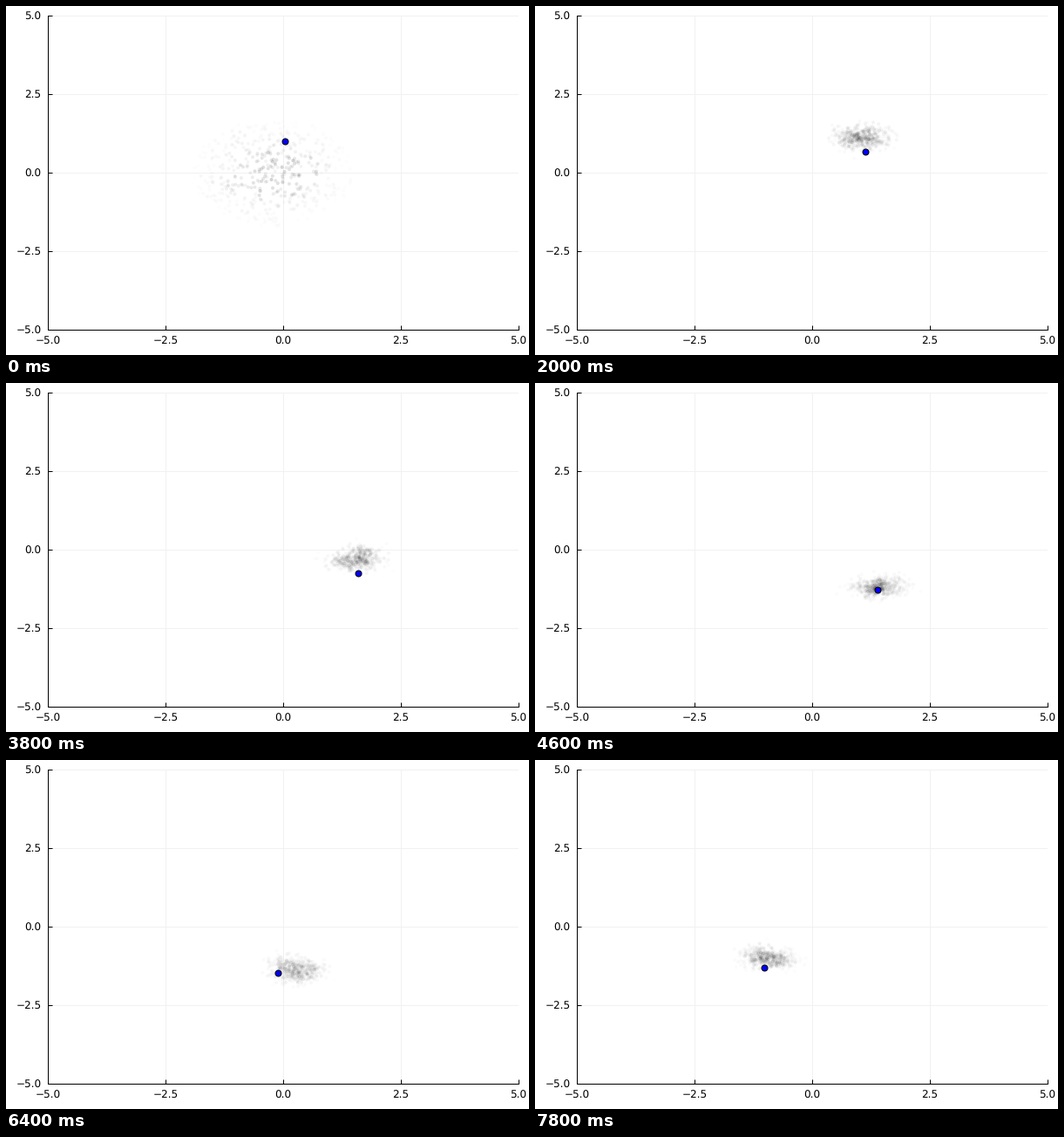
Write a matplotlib script that moves like this. It is 600 px wide and 400 px high and loops after 8000 ms.

```python
import numpy as np
import matplotlib.pyplot as plt
from matplotlib.animation import FuncAnimation

W, H = 600, 400
FRAMES, STEP = 40, 200
N, CLUMPS = 504, 12

# Key times (s), the moving point and the centre of the particle cloud
T = np.array([0, 1.2, 2.0, 3.2, 4.6, 6.4, 7.8])
TRACK = np.array([(0.04, 1.00), (0.70, 0.98), (1.13, 0.68), (1.56, -0.26),
                  (1.39, -1.28), (-0.12, -1.47), (-1.01, -1.30)])
CENTRE = np.array([(-0.20, 0.25), (0.45, 1.20), (1.05, 1.10), (1.50, 0.38),
                   (1.42, -1.20), (0.28, -1.38), (-0.93, -1.00)])

rng = np.random.default_rng(11)


def follow(points, t):
    """Cubic Hermite path through the key points."""
    slope = np.gradient(points, T, axis=0)
    i = min(np.searchsorted(T, t, side="right") - 1, len(T) - 2)
    h = T[i + 1] - T[i]
    u = (t - T[i]) / h
    ease = u * u * (3 - 2 * u)
    return ((1 - ease) * points[i] + ease * points[i + 1]
            + h * u * (1 - u) * ((1 - u) * slope[i] - u * slope[i + 1]))


def walk(count, keep):
    """Steady random walk with unit spread, one array per frame."""
    z = rng.standard_normal((count, 2))
    steps = []
    for _ in range(FRAMES):
        steps.append(z - z.mean(axis=0))
        z = keep * z + np.sqrt(1 - keep**2) * rng.standard_normal((count, 2))
    return steps


def prior():
    """Wide starting cloud, opacity falling away from its centre."""
    r = rng.random(N) ** 0.53
    a = rng.uniform(0, 2 * np.pi, N)
    xy = np.c_[-0.22 + 1.7 * r * np.cos(a), 1.72 * r * np.sin(a)]
    return xy, 0.15 * np.exp(-2.6 * r**2) * rng.uniform(0.3, 1, N)


START = prior()
DRIFT = walk(CLUMPS, 0.95)
JITTER = walk(N, 0.8)
CLUMP = np.arange(N) % CLUMPS
WEIGHT = rng.uniform(0.6, 1.4, CLUMPS)[CLUMP] * rng.uniform(0.5, 1.5, N)


def cloud(k):
    if k == 0:
        return START
    t = k * STEP / 1000
    z = 0.7 * DRIFT[k][CLUMP] + 0.7 * JITTER[k]
    spread = np.array([0.26, 0.20]) + 0.2 * np.exp(-t)
    fade = np.exp(-0.1 * (z**2).sum(axis=1))
    alpha = (0.038 + 0.03 * np.exp(-t)) * WEIGHT * fade
    return follow(CENTRE, t) + spread * z, alpha


plt.rcParams.update({"font.family": "DejaVu Sans", "font.size": 12,
                     "text.hinting": "none"})
fig = plt.figure(figsize=(W / 72, H / 72), dpi=72, facecolor="white")
ax = fig.add_axes([48 / W, 29 / H, 540 / W, 360 / H])
ticks = np.arange(-5, 5.1, 2.5)
ax.set(xlim=(-5, 5), ylim=(-5, 5), xticks=ticks, yticks=ticks)
ax.set_axisbelow(True)
ax.grid(color="#f1f1f1", linewidth=1)
ax.tick_params(direction="in", length=5, width=1, pad=7.6)
ax.spines[["top", "right"]].set_visible(False)
ax.spines[["left", "bottom"]].set_linewidth(1)

dots = ax.scatter(*START[0].T, s=16, linewidths=0, zorder=3, snap=False)
point = ax.scatter(*TRACK[:1].T, s=49, facecolor="#0000ff", edgecolor="black",
                   linewidth=1, zorder=4, snap=False)


def draw(k):
    xy, alpha = cloud(k)
    dots.set_offsets(xy)
    dots.set_facecolors(np.c_[np.zeros((N, 3)), alpha])
    point.set_offsets([follow(TRACK, k * STEP / 1000)])
    return dots, point


anim = FuncAnimation(fig, draw, frames=FRAMES, init_func=lambda: draw(0),
                     interval=STEP, repeat=True, repeat_delay=0)
plt.show()
```
